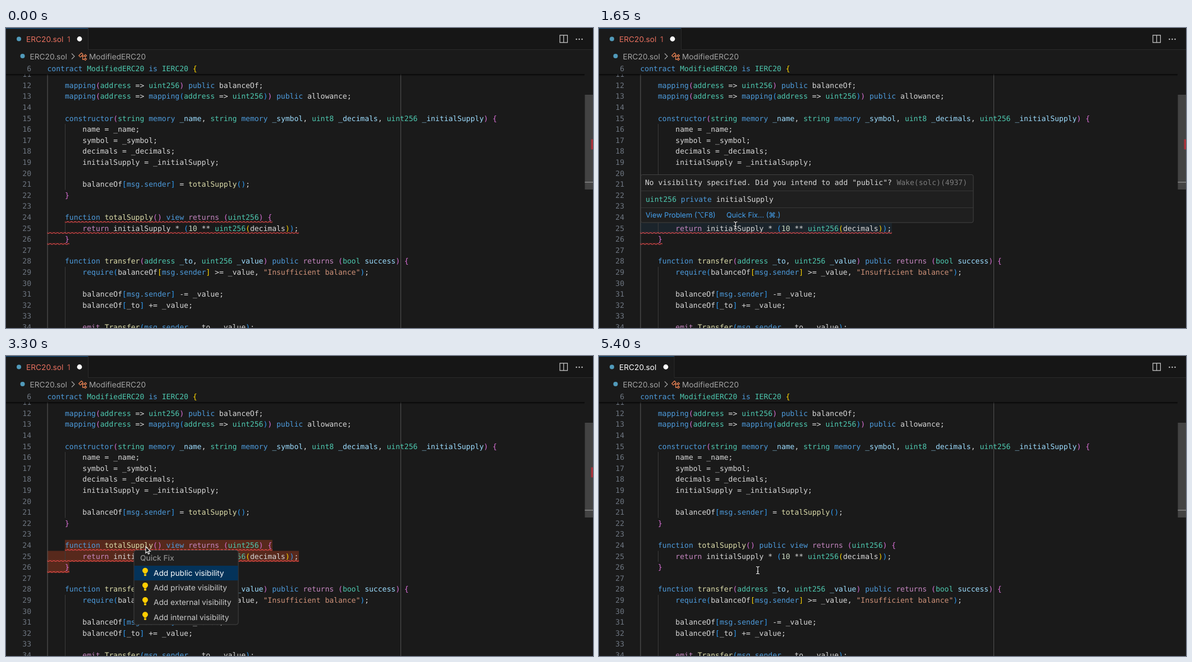
An HTML page that plays this animation: 1046x535 px, repeating every 5450 ms.

```html
<!DOCTYPE html>
<html lang="en">
<head>
<meta charset="utf-8">
<title>Quick fix in a code editor</title>
<style>
html, body { margin: 0; width: 100%; height: 100%; overflow: hidden; background: #1a1a1a; }
svg { display: block; }
text { white-space: pre; text-rendering: geometricPrecision; fill: #d8d8d8; }
.code { font: 13.067px "DejaVu Sans Mono", "Liberation Mono", monospace; }
.ui { font: 13.7px Inter, "Liberation Sans", sans-serif; }
.num { fill: #6e7681; text-anchor: end; }
</style>
</head>
<body>
<svg id="stage" width="1046" height="535" viewBox="0 0 1046 535"></svg>
<script>
const LOOP = 5450, LEFT = 73.5, CHAR = 7.867, ROW = 19.6;
const BRACKETS = ['#ffd700', '#da70d6', '#2f9cf4'];
const WORDS = {
  '#4d9bdc': 'contract is mapping public private constructor memory function view require msg.sender',
  '#4ec9b0': 'ModifiedERC20 IERC20 address uint256 uint8 string bool',
  '#dcdcaa': 'totalSupply transfer Transfer',
  '#c586c0': 'return returns emit',
};
const colorOf = {};
for (const color in WORDS) WORDS[color].split(' ').forEach(word => colorOf[word] = color);

const source = `    mapping(address => uint256) public balanceOf;
    mapping(address => mapping(address => uint256)) public allowance;

    constructor(string memory _name, string memory _symbol, uint8 _decimals, uint256 _initialSupply) {
        name = _name;
        symbol = _symbol;
        decimals = _decimals;
        initialSupply = _initialSupply;

        balanceOf[msg.sender] = totalSupply();
    }

    function totalSupply() view returns (uint256) {
        return initialSupply * (10 ** uint256(decimals));
    }

    function transfer(address _to, uint256 _value) public returns (bool success) {
        require(balanceOf[msg.sender] >= _value, "Insufficient balance");

        balanceOf[msg.sender] -= _value;
        balanceOf[_to] += _value;

        emit Transfer(msg.sender, _to, _value);`.split('\n');

const rowY = n => 102.5 + (n - 12) * ROW;
const colX = c => LEFT + c * CHAR;
const rect = (x, y, w, h, fill, more = '') =>
  `<rect x="${x}" y="${y}" width="${w}" height="${h}" fill="${fill}" ${more}/>`;
const text = (x, y, s, cls, style = '') =>
  `<text class="${cls}" x="${x}" y="${y + 4.3}" style="${style}">${s}</text>`;
const label = (x, y, s, fill, style = '') => text(x, y + .5, s, 'ui', `fill:${fill};${style}`);
const stroke = (d, color, width = 1) =>
  `<path d="${d}" fill="none" stroke="${color}" stroke-width="${width}"/>`;
const dot = (x, y, r, fill) => `<circle cx="${x}" cy="${y}" r="${r}" fill="${fill}"/>`;
const group = (id, body) => `<g id="${id}">${body}</g>`;
const escapeText = s => s.replace(/&/g, '&amp;').replace(/</g, '&lt;').replace(/>/g, '&gt;');

let depth = 0;
function paint(line) {
  const signature = /^ *(constructor|function)/.test(line);
  return line.replace(/"[^"]*"|msg\.sender|\w+|[()[\]{}]|[^\w"()[\]{}]+/g, token => {
    let color = colorOf[token];
    if (/^[([{]$/.test(token)) color = BRACKETS[depth++ % 3];
    else if (/^[)\]}]$/.test(token)) color = BRACKETS[--depth % 3];
    else if (token[0] === '"') color = '#ce9178';
    else if (/^\d/.test(token)) color = '#c9d8bf';
    else if (signature && /^(_\w+|success)$/.test(token)) color = '#9cdcfe';
    const body = escapeText(token);
    return color ? `<tspan fill="${color}">${body}</tspan>` : body;
  });
}
const codeLine = (x, y, line) => text(x, y, paint(line), 'code');
const number = (n, y = rowY(n)) => text(45, y, n, 'code num');

const header = codeLine(LEFT, 72.5, 'contract ModifiedERC20 is IERC20 {');
let code = '';
source.forEach((line, i) => {
  const n = i + 12, y = rowY(n);
  code += number(n);
  if (n === 24) {
    const outer = depth;
    code += group('oldLine', codeLine(LEFT, y, line));
    depth = outer;
    code += group('newLine', codeLine(LEFT, y, line.replace('view', 'public view')));
  } else code += codeLine(LEFT, y, line);
});

const guide = (from, to) =>
  stroke(`M105.5 ${rowY(from) - ROW / 2}V${rowY(to) + ROW / 2}`, '#3c3c3c');
const guides = guide(16, 21) + guide(25, 25) + guide(29, 34) +
  stroke('M74 82V535', '#5c5c5c') + stroke('M703.5 82V535', '#525252');

const band = (from, to, n, fill) => rect(colX(from), rowY(n) - ROW / 2, (to - from) * CHAR, ROW, fill);
const errorBands = group('errorBands',
  band(4, 51, 24, '#57291c') + band(0, 57, 25, '#57291c') + band(0, 5, 26, '#57291c'));
const hoverBand = group('hoverBand', band(0, 57, 25, '#1b242b'));

// The squiggle tile sits on the bottom edge of its row
const squiggle = `<pattern id="squiggle" width="6.533" height="3.267" viewBox="0 0 6 3"
  patternUnits="userSpaceOnUse"><path fill="#f14c4c"
  d="M5.5 0L2.5 3H1.1L4.1 0zM4 0L6 2V.6L5.4 0zM0 2L1 3H2.4L0 .6z"/></pattern>`;
const wave = (from, to, n) => rect(0, 0, (to - from) * CHAR, 3.267, 'url(#squiggle)',
  `transform="translate(${colX(from)} ${rowY(n) + ROW / 2 - 3.267})"`);
const waves = group('waves',
  group('oldWave', wave(4, 51, 24)) + group('newWave', wave(4, 58, 24)) +
  wave(0, 57, 25) + wave(0, 5, 26));

const tab = (id, width, title, dotX) => group(id,
  rect(0, 0, width, 39, '#1a1a1a') + rect(0, 0, width, 1.2, '#18507f') +
  stroke(`M${width - .5} 0V38.5H1046`, '#2b2b2b') + title + dot(dotX, 19.5, 4.4, '#fff'));

const classIcon = stroke(
  'M129.8 49.2l4.7-4.7 2.7 2.7-4.7 4.7zM135 50h4.2M136.6 50v6h2.6' +
  'M139.3 49.5l2.2-2.2 2 2-2.2 2.2zM139.3 55.6l2.2-2.2 2 2-2.2 2.2z', '#e58052', 1.3);
const chrome =
  rect(0, 0, 1046, 82, '#1a1a1a') + rect(0, 0, 1046, 38, '#161616') +
  tab('errorTab', 147, label(36, 19.8, 'ERC20.sol', '#e8705f') + label(109, 19.8, '1', '#c75f52'), 131) +
  tab('cleanTab', 134.5, label(36, 19.8, 'ERC20.sol', '#fff'), 119) +
  dot(23, 19.5, 4, '#519aba') + dot(29.5, 50, 4, '#519aba') +
  label(42.5, 51, 'ERC20.sol', '#a4a4a4') + label(148, 51, 'ModifiedERC20', '#a4a4a4') +
  stroke('M117 45.5l5 5-5 5', '#a4a4a4', 1.2) + classIcon +
  stroke('M987 12.8h13.5v13h-13.5zM993.7 12.8v13', '#ccc', 1.2) +
  [1016.5, 1021.5, 1026.5].map(x => dot(x, 20, 1.2, '#ccc')).join('') +
  number(6, 73) + header + rect(0, 82, 1031, 4, 'url(#shade)');

const scrollbar = rect(1031.5, 119, 14.5, 169, '#434343') + rect(1031.5, 274, 14.5, 2, '#777') +
  group('errorMark', rect(1042.5, 198.5, 3.5, 18, '#a8323a'));

const small = 'font-size:12.8px';
const hover = group('hover',
  rect(74.5, 261.5, 592.5, 85.5, '#1f1f1f', 'rx="3" stroke="#424242"') +
  stroke('M75 290.5H667M75 320.5H667', '#363636') +
  text(82, 275.5, 'No visibility specified. Did you intend to add "public"?', 'code') +
  text(530.4, 275.5, 'Wake(solc)(4937)', 'code', 'fill:#7c7c7c') +
  codeLine(83, 305.3, 'uint256 private initialSupply') +
  label(83, 332.7, 'View Problem (⌥F8)', '#45a2f0', small) +
  label(227, 332.7, 'Quick Fix... (⌘.)', '#45a2f0', small));

const bulb = y =>
  `<path fill="#fc0" d="M246 ${y + 2.5}c0-2-3-2.5-3-5.5a5 5 0 0 1 10 0c0 3-3 3.5-3 5.5z"/>` +
  rect(246, y + 3.2, 4, 3.3, '#fc0', 'rx="1"');
const menu = group('menu',
  rect(228, 346.5, 186, 132.5, '#1f1f1f', 'rx="4" stroke="#424242"') +
  label(239, 360, 'Quick Fix', '#8f8f8f', 'font-weight:500') +
  rect(228.5, 374, 185, 26.2, '#04335a') +
  ['public', 'private', 'external', 'internal'].map((kind, i) => {
    const y = 387.2 + i * 26.2;
    return bulb(y - 1.5) + label(263, y, `Add ${kind} visibility`, i ? '#ccc' : '#fff');
  }).join(''));

const beam = 'M-3-6.5Q0-6.5 0-4.5V4.5Q0 6.5-3 6.5M3-6.5Q0-6.5 0-4.5M3 6.5Q0 6.5 0 4.5M-1.5 2h3';
const cursor = group('cursor',
  group('beam', stroke(beam, '#111', 3) + stroke(beam, '#eee', 1.2)) +
  group('hand', '<path fill="#fff" stroke="#111" stroke-width=".9" d="M-1 0q1-1 2 0v4l5 1.5q1.5.5 1 2l-1 4H0l-4-4.5q0-2 1.5-1.5L-1 7z"/>') +
  group('arrow', '<path fill="#111" stroke="#fff" stroke-width="1.1" d="M0 0v11.5l2.7-2.4 1.9 4.2 2-.9-1.9-4.1h3.7z"/>'));

const stage = document.getElementById('stage');
stage.innerHTML =
  '<defs><linearGradient id="shade" x2="0" y2="1"><stop stop-color="#000" stop-opacity=".75"/>' +
  `<stop offset="1" stop-color="#000" stop-opacity="0"/></linearGradient>${squiggle}</defs>` +
  rect(0, 0, 1046, 535, '#1a1a1a') + errorBands + hoverBand + guides + number(11) + code + waves +
  chrome + scrollbar + hover + menu + cursor;

const part = {};
stage.querySelectorAll('g[id]').forEach(g => part[g.id] = g);
const show = (id, on) => part[id].style.display = on ? '' : 'none';

// Pointer stops: time, x, y
const stops = [
  [350, 470, 545], [850, 242.5, 361], [1450, 242.5, 361], [1950, 245, 336],
  [2800, 245, 336], [3150, 249, 340], [3450, 249, 340], [3900, 283, 382], [LOOP, 283, 382],
];
function pointer(t) {
  const i = Math.max(1, stops.findIndex(s => s[0] >= t));
  const [t0, x0, y0] = stops[i - 1], [t1, x1, y1] = stops[i];
  const u = Math.max(0, (t - t0) / (t1 - t0)), k = u * u * (3 - 2 * u);
  return [x0 + (x1 - x0) * k, y0 + (y1 - y0) * k];
}

function draw(t) {
  const hovering = t >= 1140 && t < 2550, menuOpen = t >= 2600 && t < 4500;
  const fixed = t >= 4550, clean = t >= 5200;
  const hand = t >= 1700 && t < 2550, arrow = t >= 2550 && t < 3600;
  show('hover', hovering);
  part.hover.style.opacity = Math.min(1, (t - 1140) / 100);
  show('hoverBand', hovering);
  show('menu', menuOpen);
  show('errorBands', menuOpen);
  show('oldLine', !fixed);
  show('newLine', fixed);
  show('oldWave', !fixed && !hovering);
  show('newWave', fixed);
  show('waves', !clean);
  show('errorMark', !clean);
  show('errorTab', !clean);
  show('cleanTab', clean);
  show('cursor', t >= 350);
  show('hand', hand);
  show('arrow', arrow);
  show('beam', !hand && !arrow);
  part.cursor.setAttribute('transform', `translate(${pointer(t)})`);
}

const start = performance.now();
function tick() {
  draw((performance.now() - start) % LOOP);
  requestAnimationFrame(tick);
}
draw(0);
tick();
</script>
</body>
</html>
```
